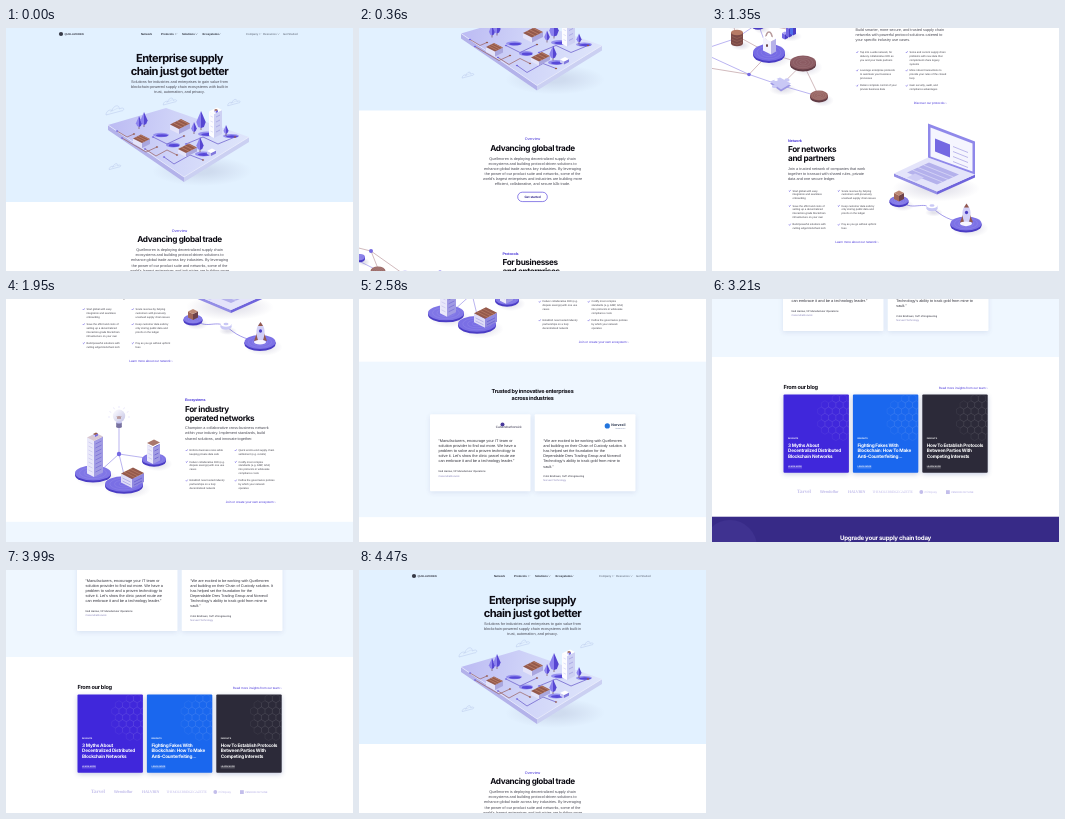
Recreate the animation shown at these times as an HTML page with a canvas. Size 347x243 px, loop 4500 ms.

```html
<!DOCTYPE html>
<html lang="en">
<head>
<meta charset="utf-8">
<title>Supply chain landing page</title>
<style>
html, body { margin: 0; width: 100%; height: 100%; overflow: hidden; background: #fff; }
canvas { display: block; width: 347px; height: 243px; }
</style>
</head>
<body>
<canvas id="stage"></canvas>
<script>
const W = 347, H = 243, FRAME = 30, FRAMES = 150, TURN = 129, SPEED = 7.626;
const canvas = document.getElementById('stage');
const ctx = canvas.getContext('2d');
const ratio = window.devicePixelRatio || 1;
canvas.width = W * ratio;
canvas.height = H * ratio;

const SANS = '"Liberation Sans", Arial, sans-serif';
const DISPLAY = 'Inter, "Liberation Sans", sans-serif';
const SERIF = '"Liberation Serif", Times, serif';
const INK = '#0b0a12', BODY = '#4a4a55', VIOLET = '#4330d8';
const LILAC = '#c9c8f5', PURPLE = '#7468e2', DEEP = '#4a3cc4';
const BROWN = '#94594b', DARK = '#613b44';

// ---- helpers ----
function text(s, x, y, size, color = INK, { bold = false, align = 'left', font = SANS, track = 0 } = {}) {
  ctx.font = `${bold ? 'bold ' : ''}${size}px ${font}`;
  ctx.letterSpacing = `${(track * size).toFixed(3)}px`;
  ctx.textAlign = align;
  ctx.fillStyle = color;
  ctx.fillText(s, x, y);
}
function lines(list, x, y, step, size, color, opts) {
  list.forEach((s, i) => text(s, x, y + i * step, size, color, opts));
}
function heading(list, x, y, step, size, align = 'left', color = INK) {
  lines(list, x, y, step, size, color, { bold: true, align, font: DISPLAY, track: -0.046 });
}
function rect(x, y, w, h, color) {
  ctx.fillStyle = color;
  ctx.fillRect(x, y, w, h);
}
function path(points, close) {
  ctx.beginPath();
  points.forEach(([x, y], i) => i ? ctx.lineTo(x, y) : ctx.moveTo(x, y));
  if (close) ctx.closePath();
}
function poly(points, color) {
  path(points, true);
  ctx.fillStyle = color;
  ctx.fill();
}
function stroke(points, color, width = 0.5) {
  path(points);
  ctx.strokeStyle = color;
  ctx.lineWidth = width;
  ctx.stroke();
}
function oval(x, y, rx, ry, color) {
  ctx.beginPath();
  ctx.ellipse(x, y, rx, ry, 0, 0, Math.PI * 2);
  ctx.fillStyle = color;
  ctx.fill();
}
function ring(x, y, rx, ry, color, width = 0.5) {
  ctx.beginPath();
  ctx.ellipse(x, y, rx, ry, 0, 0, Math.PI * 2);
  ctx.strokeStyle = color;
  ctx.lineWidth = width;
  ctx.stroke();
}
function shade(x, y, rx, ry, alpha = 0.16) {
  ctx.save();
  ctx.translate(x, y);
  ctx.scale(rx, ry);
  const g = ctx.createRadialGradient(0, 0, 0.2, 0, 0, 1);
  g.addColorStop(0, `rgba(80,75,130,${alpha})`);
  g.addColorStop(1, 'rgba(80,75,130,0)');
  oval(0, 0, 1, 1, g);
  ctx.restore();
}
function cylinder(x, y, rx, ry, h, top, side) {
  oval(x, y + h, rx, ry, side);
  rect(x - rx, y, rx * 2, h, side);
  oval(x, y, rx, ry, top);
}
function plate(x, y, rx, ry, top, side) {
  shade(x + 4, y + 5, rx * 1.2, ry * 1.25);
  cylinder(x, y, rx, ry, 2, top, side);
  for (let k = 0.25; k < 1; k += 0.25) ring(x, y, rx * k, ry * k, 'rgba(255,255,255,.25)', 0.3);
}
// Isometric block, (x, y) is its lowest corner.
function block(x, y, a, b, h, left, right, top) {
  const l = [x - a, y - a / 2], r = [x + b, y - b / 2];
  const up = ([px, py]) => [px, py - h];
  poly([[x, y], l, up(l), [x, y - h]], left);
  poly([[x, y], r, up(r), [x, y - h]], right);
  poly([[x, y - h], up(l), [x - a + b, y - (a + b) / 2 - h], up(r)], top);
}
function windows(x, y, a, rows, step, slope, color) {
  for (let i = 0; i < rows; i++) {
    stroke([[x, y - i * step], [x + a, y - i * step + slope]], color, 0.9);
  }
}
function card(x, y, w, h, color, alpha) {
  ctx.save();
  ctx.shadowColor = `rgba(70,90,160,${alpha})`;
  ctx.shadowBlur = 5 * ratio;
  ctx.shadowOffsetY = 1.5 * ratio;
  ctx.beginPath();
  ctx.roundRect(x, y, w, h, 1);
  ctx.fillStyle = color;
  ctx.fill();
  ctx.restore();
}
function chevron(x, y, color) {
  stroke([[x - 0.8, y - 0.4], [x, y + 0.4], [x + 0.8, y - 0.4]], color, 0.4);
}

// ---- hero ----
function tree(x, y, h) {
  const w = h * 0.28;
  stroke([[x, y + 2], [x, y - h / 2]], DARK, 0.6);
  poly([[x, y - h], [x + w, y - h * 0.35], [x + w * 0.6, y - 1], [x, y]], '#5646d2');
  poly([[x, y - h], [x - w, y - h * 0.35], [x - w * 0.6, y - 1], [x, y]], '#8c82ee');
}
function cloud(x, y, s) {
  ctx.beginPath();
  ctx.moveTo(x - 9 * s, y + 4 * s);
  ctx.bezierCurveTo(x - 9 * s, y - s, x - 3 * s, y - 2 * s, x - 3 * s, y);
  ctx.bezierCurveTo(x - 2 * s, y - 6 * s, x + 5 * s, y - 7 * s, x + 4 * s, y - 2 * s);
  ctx.bezierCurveTo(x + 10 * s, y - 5 * s, x + 10 * s, y, x + 6 * s, y);
  ctx.closePath();
  ctx.strokeStyle = '#b4c3e8';
  ctx.lineWidth = 0.45;
  ctx.stroke();
  stroke([[x - 5 * s, y + s], [x + 3 * s, y - 3 * s]], '#c3d0ee', 0.4);
}
function cabin(x, y, a, b, h) {
  block(x, y, a, b, h, '#e4e3f9', '#a9a6de', BROWN);
  for (let k = 0.3; k < 1; k += 0.3) {
    stroke([[x - a + b * k, y - a / 2 - b * k / 2 - h], [x + b * k, y - b * k / 2 - h]], '#c98d72', 0.6);
  }
}
function island() {
  shade(196, 143, 50, 15, 0.13);
  poly([[102, 97], [178, 149], [178, 154], [102, 102]], '#b3b2ea');
  poly([[178, 149], [243, 109], [243, 114], [178, 154]], '#cbd0f2');
  const g = ctx.createLinearGradient(103, 95, 243, 120);
  g.addColorStop(0, '#bcbbf3');
  g.addColorStop(0.45, '#cfd3f8');
  g.addColorStop(1, '#dfe6fb');
  poly([[102, 97], [160, 80], [243, 109], [178, 149]], g);
  stroke([[102, 97], [178, 149], [243, 109]], '#eceefd', 0.7);
  const pools = [[155, 107, 8, 2.2], [167, 117, 7, 2.4], [201, 106, 9, 2.6], [225, 108, 8, 2], [197, 126, 8, 2.4]];
  pools.forEach(([x, y, rx, ry]) => {
    oval(x, y, rx, ry, '#9590ee');
    oval(x + 1, y + 0.5, rx * 0.75, ry * 0.6, '#5748d8');
  });
  const tracks = [
    [[111, 103], [121, 109], [128, 106]], [[116, 110], [128, 117], [140, 124], [151, 119]],
    [[139, 121], [150, 128], [161, 122], [171, 127]], [[147, 109], [161, 116], [178, 108]],
    [[158, 129], [168, 136], [184, 127], [197, 132]], [[180, 116], [197, 109], [212, 116], [229, 109]],
  ];
  tracks.forEach((t, i) => {
    stroke(t, i < 3 ? '#9a615f' : '#6556c9', 0.7);
    oval(...t[0], 1.2, 0.8, PURPLE);
    oval(...t[t.length - 1], 1.2, 0.8, BROWN);
  });
  tree(133, 99, 11);
  tree(138, 97, 13);
  cabin(136, 120, 9, 8, 5);
  cabin(173, 106, 9, 11, 5);
  tree(188, 104, 10);
  tree(195, 100, 17);
  block(208, 110, 5, 8, 24, '#fcfcff', '#cdd0f3', '#fff');
  windows(210, 104, 4, 4, 5, -2, '#a9a8e4');
  windows(204.5, 103, 2.5, 4, 5, 1.2, '#dddffa');
  block(210, 85, 2, 2, 2, LILAC, PURPLE, BROWN);
  tree(220, 106, 9);
  cabin(180, 129, 8, 11, 4);
  tree(194, 122, 13);
  block(205, 128, 4, 5, 3, LILAC, '#8178dc', '#fff');
}
function hero() {
  rect(0, 0, W, 174, '#e2f1ff');
  oval(55, 6, 2.1, 2.1, '#363946');
  text('QUELLMOREN', 58.5, 6, 2.7, '#363946', { bold: true });
  [['Network', 135], ['Protocols', 155, 170], ['Solutions', 176, 190.5], ['Ecosystems', 196.5, 213.5]]
    .forEach(([s, x, c]) => {
      text(s, x, 6, 2.8, '#242733', { bold: true });
      if (c) chevron(c, 6, '#242733');
    });
  [['Company', 240, 254], ['Resources', 257, 272.5], ['Get Started', 277]].forEach(([s, x, c]) => {
    text(s, x, 6, 2.85, '#555d6c');
    if (c) chevron(c, 6, '#555d6c');
  });
  heading(['Enterprise supply', 'chain just got better'], 173.5, 31, 12.2, 11.1, 'center');
  lines(['Solutions for industries and enterprises to gain value from',
    'blockchain-powered supply chain ecosystems with built-in', 'trust, automation, and privacy.'],
    173.5, 53.5, 5.1, 3.8, BODY, { align: 'center' });
  cloud(109, 83, 1);
  cloud(164, 74, 0.75);
  cloud(228, 75, 0.7);
  cloud(109, 139, 0.65);
  island();
}

function overview() {
  text('Overview', 173.5, 202.7, 3.7, VIOLET, { align: 'center' });
  heading(['Advancing global trade'], 173.5, 211.8, 9, 8.2, 'center');
  lines(['Quellmoren is deploying decentralized supply chain',
    'ecosystems and building protocol-driven solutions to',
    'enhance global trade across key industries. By leveraging',
    'the power of our product suite and networks, some of the',
    'world\u2019s largest enterprises and industries are building more',
    'efficient, collaborative, and secure b2b trade.'],
    173.5, 222.2, 5.1, 3.8, BODY, { align: 'center' });
  ctx.beginPath();
  ctx.roundRect(158.7, 255.7, 29.6, 9.4, 4.7);
  ctx.strokeStyle = VIOLET;
  ctx.lineWidth = 0.6;
  ctx.stroke();
  text('Get started', 173.5, 260.5, 3.2, '#2c2188', { bold: true, align: 'center', track: -0.02 });
}

// ---- three feature sections ----
function feature({ x, y, label, title, intro, rows, link, right, columns }) {
  text(label, x, y, 3.7, VIOLET, { bold: true, track: -0.03 });
  heading(title, x, y + 9, 9, 8.2);
  lines(intro, x, y + 28, 5.1, 3.8, BODY);
  rows.forEach(([dy, ...cells]) => cells.forEach((cell, i) => {
    const cx = x + i * columns;
    stroke([[cx + 0.8, y + dy], [cx + 1.5, y + dy + 0.7], [cx + 2.6, y + dy - 0.9]], VIOLET, 0.5);
    lines(cell.split('|'), cx + 4.5, y + dy, 3.9, 2.65, '#3c3c46');
  }));
  text(link + ' \u203a', right, y + 101.8, 3.1, VIOLET, { align: 'right' });
}
function protocolArt() {
  ctx.save();
  ctx.translate(0, 190.6);
  const links = [
    [[0, 121], [12, 124], [46, 148], [77, 154]], [[0, 134], [20, 144], [46, 148]],
    [[12, 124], [20, 144], [24, 160], [57, 178]], [[0, 171], [24, 163], [46, 148], [57, 178]],
    [[0, 193], [37, 199], [57, 178], [91, 188]], [[0, 182], [37, 199], [69, 210], [107, 221]],
    [[69, 210], [91, 188], [107, 221]],
  ];
  links.forEach((l, i) => stroke(l, i % 2 ? '#8c82e8' : '#b28b91', 0.6));
  oval(12, 124, 2, 2, PURPLE);
  oval(37, 199, 1.8, 1.8, PURPLE);
  plate(1, 130, 5, 3.2, '#8379e6', DEEP);
  plate(19, 144, 7.5, 4.6, '#9c6b68', DARK);
  plate(46, 148, 6.8, 4.4, '#7b70e6', DEEP);
  shade(29, 170, 10, 5);
  cylinder(25, 157, 6, 2.8, 11, '#b77b66', '#7b4a48');
  for (let i = 0; i < 3; i++) stroke([[20, 161 + i * 3], [25, 163 + i * 3], [30, 161 + i * 3]], '#a8705f', 0.5);
  shade(79, 161, 11, 5);
  block(73, 164, 3, 3, 5, PURPLE, DEEP, '#a7a0f3');
  block(77, 162, 3, 3, 9, PURPLE, DEEP, '#a7a0f3');
  block(81, 160, 3, 3, 14, '#506dea', DEEP, '#a7a0f3');
  plate(57, 177, 16, 8.5, '#766be4', DEEP);
  ring(57, 163, 3.2, 6.5, '#b79a9b', 1.5);
  poly([[51, 162], [59, 166], [59, 179], [51, 175]], '#f3f2fd');
  poly([[59, 166], [64, 163], [64, 176], [59, 179]], '#b6b2e9');
  poly([[51, 162], [56, 160], [64, 163], [59, 166]], '#fff');
  oval(55, 170, 1, 1.5, DARK);
  plate(91, 187, 13, 7, '#8b5b62', DARK);
  plate(107, 220, 9, 5, '#986663', DARK);
  shade(71, 214, 14, 6);
  poly([[58, 208], [68, 204], [79, 210], [69, 216]], '#9c97e4');
  poly([[58, 206], [68, 202], [79, 208], [69, 214]], LILAC);
  oval(62.5, 211, 2.6, 1.6, LILAC);
  oval(75, 204.5, 2.6, 1.6, LILAC);
  oval(64, 204.5, 1.8, 1.1, '#fff');
  ctx.restore();
}
function laptop() {
  poly([[182, -7], [225, 11], [225, 14], [182, -4]], '#938de6');
  poly([[225, 11], [263, -6], [263, -3], [225, 14]], '#6f64dc');
  poly([[182, -7], [216, -23], [263, -6], [225, 11]], '#e4e4fa');
  poly([[195, -8], [217, -18], [247, -6], [225, 4]], '#b4b1ec');
  for (let i = 1; i < 4; i++) stroke([[195 + i * 5.5, -8 - i * 2.5], [225 + i * 5.5, 4 - i * 2.5]], '#e4e4fa', 0.6);
  poly([[195, -3], [203, -7], [212, -3], [204, 1]], '#cfcdf5');
  poly([[216, -23], [263, -6], [263, -39], [216, -57]], '#8f88ea');
  poly([[218.5, -24], [260.5, -9], [260.5, -37], [218.5, -53]], '#f5f5fe');
  poly([[223, -29], [238, -23], [238, -36], [223, -42]], PURPLE);
  windows(241, -34, 15, 4, -5, 6, '#b6b2e9');
}
function networkArt() {
  ctx.save();
  ctx.translate(0, 495.7);
  shade(224, 8, 44, 13);
  ctx.beginPath();
  ctx.moveTo(188, 20);
  ctx.bezierCurveTo(200, 31, 208, 21, 220, 27);
  ctx.bezierCurveTo(230, 36, 238, 40, 254, 43);
  ctx.strokeStyle = '#7d72e2';
  ctx.lineWidth = 0.7;
  ctx.stroke();
  laptop();
  plate(187, 20, 9.5, 4.6, '#8177e7', DEEP);
  block(187, 21, 5, 5, 6, '#a0675a', '#6d424a', '#bd8975');
  shade(222, 32, 9, 4);
  cylinder(220, 25, 5.5, 2.7, 3, '#fff', LILAC);
  oval(220, 25, 2.5, 1.2, LILAC);
  plate(254, 43, 15.5, 7, '#7d72e6', DEEP);
  oval(254, 43, 6, 2.6, '#f7f5ff');
  poly([[251, 34], [248, 42], [252, 41]], BROWN);
  poly([[258, 34], [261, 42], [257, 41]], BROWN);
  ctx.beginPath();
  ctx.moveTo(254.5, 23);
  ctx.bezierCurveTo(260, 29, 259, 35, 257, 41);
  ctx.lineTo(252, 41);
  ctx.bezierCurveTo(250, 35, 249, 29, 254.5, 23);
  ctx.fillStyle = '#d2d0f7';
  ctx.fill();
  poly([[254.5, 23], [257, 27], [252, 27]], BROWN);
  oval(254.5, 32, 1.6, 1.8, DEEP);
  ctx.restore();
}
function ecosystemArt() {
  ctx.save();
  ctx.translate(0, 495.7);
  [[92, 174], [147, 160], [120, 184], [113, 128]].forEach(p => stroke([[113, 155], p], '#9c94e8', 0.7));
  for (let i = 0; i < 7; i++) {
    const a = Math.PI * (1 + i / 6), c = Math.cos(a), s = Math.sin(a);
    stroke([[113 + c * 9, 118 + s * 9], [113 + c * 11, 118 + s * 11]], '#c9c5f3', 0.4);
  }
  const glass = ctx.createLinearGradient(107, 112, 119, 124);
  glass.addColorStop(0, '#fbfbff');
  glass.addColorStop(1, '#c3c2e4');
  oval(113, 117, 6.2, 6.4, glass);
  stroke([[111, 117], [112, 120], [113, 117], [114, 120], [115, 117]], BROWN, 0.5);
  cylinder(113, 123.5, 2.8, 1, 4.5, LILAC, '#77719f');
  oval(113, 155, 2.2, 2.2, PURPLE);
  plate(87, 174, 18, 7.5, '#8076e6', DEEP);
  block(88, 178, 7, 9, 36, '#e9e8fa', '#a19be3', '#d9c8d2');
  windows(89.5, 173, 6, 8, 4, -3, '#7f76d9');
  windows(82.5, 171, 4, 8, 4, 2, '#cfccf0');
  block(89, 138, 2, 3, 2, LILAC, PURPLE, BROWN);
  plate(148, 160, 12, 5.8, '#8076e6', DEEP);
  block(147, 165, 6, 7, 17, '#ebeafa', '#a19be3', '#fff');
  windows(148.5, 160, 4, 4, 4, -2, '#7169d2');
  windows(142.5, 158.5, 3.5, 4, 4, 1.8, '#cfccf0');
  poly([[141, 144], [147, 147], [154, 143.5], [148, 140.5]], '#a9776c');
  plate(118, 185, 19, 7.8, '#7a6fe5', DEEP);
  block(126, 189, 11, 12, 9, '#dedcf7', '#9089df', BROWN);
  for (let i = 1; i < 4; i++) {
    stroke([[115 + i * 3, 174.5 - i * 1.5], [126 + i * 3, 180 - i * 1.5]], '#c98d72', 0.5);
  }
  windows(128, 186, 8, 2, 3, -4, '#6c62d2');
  windows(116.5, 182, 8, 2, 3, 4, '#b3aee8');
  ctx.restore();
}
function features() {
  protocolArt();
  feature({ x: 143.5, y: 317, columns: 49.5, right: 234.5,
    label: 'Protocols', title: ['For businesses', 'and enterprises'],
    intro: ['Build smarter, more secure, and trusted supply chain',
      'networks with powerful protocol solutions catered to', 'your specific industry use cases.'],
    rows: [
      [50.3, 'Tap into a wide network, for|delivery collaborative ROI as|you and your trade partners',
        'Solve and current supply chain|problems with new data that|complement share legacy|systems'],
      [68.6, 'Leverage enterprise protocols|to automate your business|processes',
        'More robust transactions to|provide your rules of the closed|loop'],
      [83.8, 'Retain complete control of your|private business data', 'Gain security, audit, and|compliance advantages'],
    ], link: 'Discover our protocols' });
  networkArt();
  feature({ x: 76, y: 456, columns: 49, right: 166.5,
    label: 'Network', title: ['For networks', 'and partners'],
    intro: ['Join a trusted network of companies that work', 'together to transact with shared rules, private', 'data and one secure ledger.'],
    rows: [
      [50, 'Start global with easy|integration and seamless|onboarding', 'Scale revenue by helping|customers with previously|unsolved supply chain issues'],
      [65, 'Save the effort and costs of|setting up a decentralized|interaction-grade blockchain|infrastructure on your own',
        'Keep customer data safe by|only storing public data and|proofs on the ledger'],
      [83.8, 'Build powerful solutions with|cutting edge blockchain tech', 'Pay as you go without upfront|fees'],
    ], link: 'Learn more about our network' });
  ecosystemArt();
  feature({ x: 179, y: 597, columns: 49, right: 269.5,
    label: 'Ecosystems', title: ['For industry', 'operated networks'],
    intro: ['Champion a collaborative cross-business network', 'within your industry. Implement standards, build', 'shared solutions, and innovate together.'],
    rows: [
      [50, 'Enforce business rules while|keeping private data safe', 'Quick end-to-end supply chain|settlement (e.g. recalls)'],
      [61.5, 'Deliver collaborative ROI (e.g.|dispute savings) with one use|cases', 'Codify most complex|standards (e.g. GMP, GS1)|into protocols in wholesale|compliance costs'],
      [80.2, 'Establish new trusted industry|partnerships on a truly|decentralized network', 'Define the governance policies|by which your network|operates'],
    ], link: 'Join or create your own ecosystem' });
}

// ---- lower page ----
function testimonials() {
  rect(0, 718.5, W, 155.5, '#eff7ff');
  heading(['Trusted by innovative enterprises', 'across industries'], 173.5, 748, 6.7, 5.5, 'center');
  card(71, 771, 100.5, 77, '#fff', 0.14);
  card(175.7, 771, 100.8, 77, '#fff', 0.14);
  oval(143.5, 781.3, 2, 2, '#4a3a9c');
  text('Calvendrathorwick', 162.5, 784.2, 3.2, '#33304a', { align: 'right', track: -0.01 });
  oval(248.3, 782.8, 2.6, 2.6, '#2275dd');
  text('Norvexil', 266.5, 782.2, 3.6, '#1d2a44', { bold: true, align: 'right' });
  text('TECHNOLOGY', 266.5, 785.3, 1.5, '#6c7fa2', { align: 'right' });
  lines(['\u201cManufacturers, encourage your IT team or', 'solution provider to find out more. We have a',
    'problem to solve and a proven technology to', 'solve it. Let\u2019s show the clinic parcel route we',
    'can embrace it and be a technology leader.\u201d'], 79.5, 797.8, 5.1, 3.9, '#33333d');
  text('Ned Harrow, VP Manufacturer Operations', 79.5, 828.2, 2.55, '#222230');
  text('Calvendrathorwick', 79.5, 832.7, 2.55, '#8580b8');
  lines(['\u201cWe are excited to be working with Quellmoren', 'and building on their Chain of Custody solution. It',
    'has helped set the foundation for the', 'Dependable Ores Trading Group and Norvexil',
    'Technology\u2019s ability to track gold from mine to', 'vault.\u201d'], 184.3, 797.8, 5.1, 3.8, '#33333d');
  text('Colin Brathwen, SVP of Engineering', 184.3, 833, 2.55, '#222230');
  text('Norvexil Technology', 184.3, 837.4, 2.55, '#8580b8');
}
function honeycomb(x, y, w, h) {
  const r = 4.2, dx = r * Math.sqrt(3), cx = x + 56, cy = y + 23;
  ctx.save();
  ctx.beginPath();
  ctx.rect(x, y, w, h);
  ctx.clip();
  for (let row = -4; row <= 4; row++) {
    for (let col = -4; col <= 4; col++) {
      const px = cx + (col + (row & 1) / 2) * dx, py = cy + row * r * 1.5;
      if (Math.hypot(px - cx, py - cy) > 21) continue;
      const hex = [0, 1, 2, 3, 4, 5, 6].map(k => {
        const a = Math.PI * (k / 3 + 1 / 6);
        return [px + r * Math.cos(a), py + r * Math.sin(a)];
      });
      stroke(hex, 'rgba(255,255,255,.13)', 0.4);
    }
  }
  ctx.restore();
}
function blog() {
  heading(['From our blog'], 71.5, 904, 6, 5.6);
  text('Read more insights from our team \u203a', 275.5, 905.3, 3.1, VIOLET, { align: 'right' });
  [[71.5, '#4027db', ['3 Myths About', 'Decentralized Distributed', 'Blockchain Networks']],
    [140.9, '#1a67ee', ['Fighting Fakes With', 'Blockchain: How To Make', 'Anti-Counterfeiting...']],
    [210.3, '#2c2a39', ['How To Establish Protocols', 'Between Parties With', 'Competing Interests']],
  ].forEach(([x, color, title]) => {
    card(x, 911.5, 65.4, 78.2, color, 0.3);
    honeycomb(x, 911.5, 65.4, 78.2);
    text('INSIGHTS', x + 4.5, 955.3, 2.2, '#fff', { bold: true });
    heading(title, x + 4.5, 962.3, 5.7, 4.7, 'left', '#fff');
    text('LEARN MORE', x + 4.5, 983, 2.1, '#fff', { bold: true });
    stroke([[x + 4.5, 984.8], [x + 18.5, 984.8]], '#fff', 0.3);
  });
  const tint = '#c3beeb';
  text('Tarvel', 85, 1009, 5.1, tint, { bold: true, font: SERIF });
  text('Wendolfar', 108, 1009, 4, tint, { bold: true, track: -0.03 });
  text('HALVRIN', 136, 1009, 4, tint, { bold: true, font: SERIF, track: -0.05 });
  text('THE MOLE BRIDGE GAZETTE', 160.5, 1009, 3.5, tint, { font: SERIF, track: -0.1 });
  oval(209.3, 1009, 1.9, 1.9, tint);
  text('mintquay', 212.5, 1009, 3.1, tint);
  rect(234, 1007.2, 3.8, 3.8, tint);
  text('VENDOR OUTLINE', 239, 1009, 2.5, tint, { bold: true });
}
function footer() {
  rect(0, 1033.7, W, 84, '#372a87');
  oval(18, 1064, 27, 27, '#3f3290');
  heading(['Upgrade your supply chain today'], 173.5, 1055, 7, 6.2, 'center', '#fff');
  lines(['Talk with our team about the right solution', 'for your business.'],
    173.5, 1065.5, 5.1, 3.8, '#dcd8fa', { align: 'center' });
  card(157, 1080, 33, 10, '#fff', 0);
  text('Get started', 173.5, 1085, 3.2, '#372a87', { bold: true, align: 'center' });
  oval(74, 1139, 2.1, 2.1, '#363946');
  text('QUELLMOREN', 77.5, 1139, 2.7, '#363946', { bold: true });
  [['Protocols', 'Custody', 'Contracts', 'Registry'], ['Solutions', 'Networks', 'Ecosystems', 'Enterprise'],
    ['Company', 'About', 'Careers', 'Contact'], ['Resources', 'Blog', 'News', 'Documents']]
    .forEach(([head, ...items], i) => {
      text(head, 139 + i * 37, 1139, 3, INK, { bold: true });
      lines(items, 139 + i * 37, 1147, 7, 2.9, BODY);
    });
  text('All rights reserved.', 72, 1212, 2.6, '#8a8a98');
}

function scrollAt(frame) {
  if (frame <= TURN) return frame * SPEED;
  return TURN * SPEED * (FRAMES - 1 - frame) / (FRAMES - 1 - TURN);
}
function draw(now) {
  const frame = Math.floor(now / FRAME) % FRAMES;
  ctx.setTransform(ratio, 0, 0, ratio, 0, 0);
  ctx.textBaseline = 'middle';
  ctx.textRendering = 'geometricPrecision';
  ctx.lineJoin = 'round';
  rect(0, 0, W, H, '#fff');
  ctx.translate(0, -scrollAt(frame));
  [hero, overview, features, testimonials, blog, footer].forEach(part => part());
}
const start = performance.now();
function tick() {
  draw(performance.now() - start);
  requestAnimationFrame(tick);
}
tick();
</script>
</body>
</html>
```
